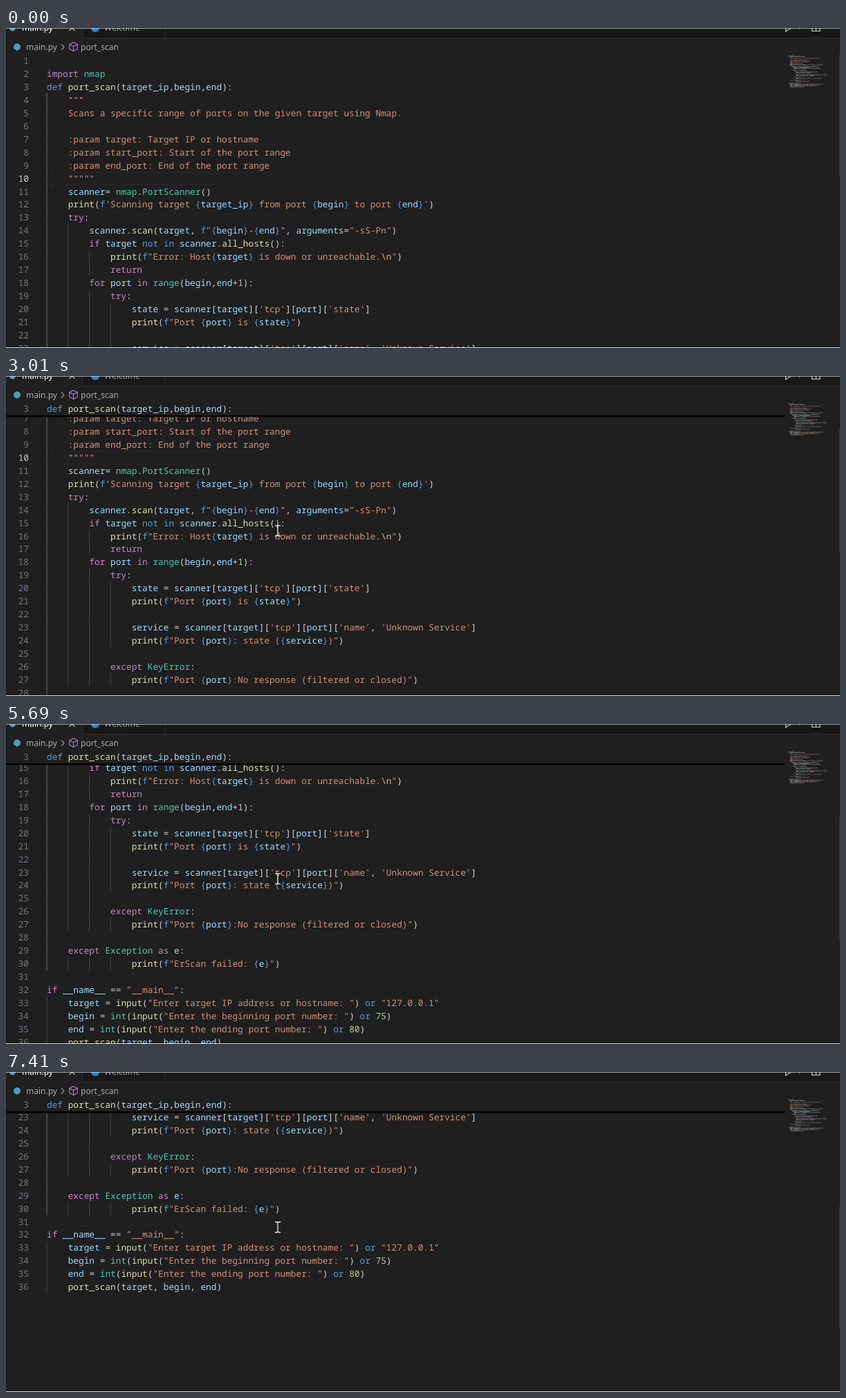
Animation of 1206x464 px, one loop 8000 ms. Source, as an HTML page:

```html
<!DOCTYPE html>
<html lang="en">
<head>
<meta charset="utf-8">
<title>Code editor scrolling</title>
<style>
  html, body { margin: 0; width: 100%; height: 100%; overflow: hidden; background: #1f1f1f; }
  svg { display: block; width: 100%; height: 100%; }
  .code text { font: 500 12.795px "Noto Sans Mono", "DejaVu Sans Mono", monospace; white-space: pre; text-rendering: geometricPrecision; }
  .ui { font: 12px "Noto Sans", "Open Sans", sans-serif; }
  #minimap { opacity: .6; filter: saturate(.5); }
</style>
</head>
<body>
<svg id="stage" viewBox="0 0 1206 464" xmlns="http://www.w3.org/2000/svg">
  <defs>
    <clipPath id="editorClip"><rect y="38" width="1206" height="426"/></clipPath>
    <linearGradient id="shade" x2="0" y2="1">
      <stop offset="0" stop-color="#000"/>
      <stop offset=".5" stop-color="#000" stop-opacity=".9"/>
      <stop offset="1" stop-color="#000" stop-opacity="0"/>
    </linearGradient>
  </defs>
  <rect width="1206" height="464" fill="#1f1f1f"/>
  <g class="code" clip-path="url(#editorClip)">
    <g id="rows"></g>
    <g id="sticky">
      <rect y="38" width="1126" height="19" fill="#1f1f1f"/>
      <rect y="57" width="1126" height="3.5" fill="url(#shade)"/>
    </g>
  </g>
  <g id="minimap"></g>
  <rect id="slider" x="1205" width="1" height="179" fill="#383838"/>

  <g class="ui">
    <rect x="110" width="1096" height="15" fill="#181818"/>
    <path d="M110.5 0V14.5H1206M230.5 0V14" fill="none" stroke="#2b2b2b"/>
    <circle cx="9.500" cy="0" r="4.500" fill="#519aba"/>
    <text x="23" y="4" fill="#fff">main.py</text>
    <path d="M91.500 -4L99.500 4M99.500 -4L91.500 4" stroke="#ccc" stroke-width="1.100"/>
    <circle cx="129" cy="0" r="6" fill="#2489ca"/>
    <text x="142" y="4" fill="#9d9d9d">Welcome</text>
    <g fill="none" stroke="#ccc" stroke-width="1.100">
      <path d="M1127.500 -5V5L1135.500 0Z"/>
      <path d="M1144.500 -2L1147.500 1L1150.500 -2" stroke="#999"/>
      <path d="M1165.500 -7H1177V4.500H1165.500ZM1171.300 -7V4.500"/>
    </g>
    <circle cx="16" cy="27.500" r="5" fill="#519aba"/>
    <g fill="#a9a9a9">
      <text x="29" y="31.800">main.py</text>
      <text x="108" y="31.800">port_scan</text>
    </g>
    <path d="M80 23.500L84 27.700L80 32" fill="none" stroke="#a9a9a9" stroke-width="1.100"/>
    <path d="M97.500 20.800L103.300 23.600V30.200L97.500 33.600L91.700 30.200V23.600ZM91.700 23.600L97.500 26.700L103.300 23.600M97.500 26.700V33.600"
      fill="none" stroke="#b180d7" stroke-width="1.100" stroke-linejoin="round"/>
  </g>
  <path d="M0 .4H1206" stroke="#d8d8d8" stroke-width=".8"/>
  <path d="M0 463.500H1206" stroke="#d8d8d8"/>
  <path id="cursor" d="M-4 -7.500H-1.200L0 -6.500L1.200 -7.500H4M-4 7.500H-1.200L0 6.500L1.200 7.500H4M0 -6.500V6.500"
    fill="none" stroke="#f0f0f0" stroke-width="1.300"/>
</svg>
<script>
const LOOP = 8000;
const LINE = 18.95, TOP = 38, LEFT = 59, CHAR = 7.677;
const NOTCH = 49.87;
const CURRENT = 10;
const COLORS = {
  control: '#c586c0', word: '#569cd6', type: '#4ec9b0', call: '#dcdcaa', name: '#9cdcfe',
  string: '#ce9178', escape: '#d7ba7d', number: '#b5cea8', plain: '#d4d4d4'
};
const WORDS = {
  control: ['import', 'try', 'if', 'return', 'for', 'except', 'as'],
  word: ['def', 'not', 'or'],
  type: ['nmap', 'PortScanner', 'range', 'int', 'KeyError', 'Exception']
};
const LINES = String.raw`
import nmap
def port_scan(target_ip,begin,end):
    """
    Scans a specific range of ports on the given target using Nmap.

    :param target: Target IP or hostname
    :param start_port: Start of the port range
    :param end_port: End of the port range
    """""
    scanner= nmap.PortScanner()
    print(f'Scanning target {target_ip} from port {begin} to port {end}')
    try:
        scanner.scan(target, f"{begin}-{end}", arguments="-sS-Pn")
        if target not in scanner.all_hosts():
            print(f"Error: Host{target} is down or unreachable.\n")
            return
        for port in range(begin,end+1):
            try:
                state = scanner[target]['tcp'][port]['state']
                print(f"Port {port} is {state}")

                service = scanner[target]['tcp'][port]['name', 'Unknown Service']
                print(f"Port {port}: state ({service})")

            except KeyError:
                print(f"Port {port}:No response (filtered or closed)")

    except Exception as e:
                print(f"ErScan failed: {e}")

if __name__ == "__main__":
    target = input("Enter target IP address or hostname: ") or "127.0.0.1"
    begin = int(input("Enter the beginning port number: ") or 75)
    end = int(input("Enter the ending port number: ") or 80)
    port_scan(target, begin, end)`.split('\n');

const $ = id => document.getElementById(id);

function add(parent, tag, attrs, text) {
  const node = document.createElementNS('http://www.w3.org/2000/svg', tag);
  for (const key in attrs) node.setAttribute(key, attrs[key]);
  if (text !== undefined) node.textContent = text;
  parent.appendChild(node);
  return node;
}

function wordKind(word, line, end) {
  if (/^\d/.test(word)) return 'number';
  if (word === 'in') return line.includes('not in') ? 'word' : 'control';
  for (const kind in WORDS) if (WORDS[kind].includes(word)) return kind;
  return line[end] === '(' ? 'call' : 'name';
}

// Splits one line into [text, kind] pairs.
function tokenize(line, number) {
  if (number >= 4 && number <= 10) return [[line, 'string']];
  const tokens = [];
  for (const m of line.matchAll(/\bf?(["']).*?\1|(["']).*?\2|\w+|\s+|[^\w\s"']+/g)) {
    const s = m[0];
    if (/^f["']/.test(s)) {
      tokens.push(['f', 'word']);
      for (const part of s.slice(1).split(/([{}]|\\n)/)) {
        const last = tokens[tokens.length - 1][0];
        const kind = /^[{}]$/.test(part) ? 'word' : part === '\\n' ? 'escape' : last === '{' ? 'name' : 'string';
        if (part) tokens.push([part, kind]);
      }
    } else if (/^["']/.test(s)) tokens.push([s, 'string']);
    else if (/^\w/.test(s)) tokens.push([s, wordKind(s, line, m.index + s.length)]);
    else tokens.push([s, 'plain']);
  }
  return tokens;
}

function drawLine(parent, number, y) {
  add(parent, 'text', {
    x: 33, y: y + 14, 'text-anchor': 'end', fill: number === CURRENT ? '#cccccc' : '#6e7681'
  }, number);
  const text = add(parent, 'text', { x: LEFT, y: y + 14 });
  for (const [s, kind] of tokenize(LINES[number - 1], number))
    add(text, 'tspan', { fill: COLORS[kind] }, s);
}

const indentOf = line => line.search(/\S/) / 4;

function drawGuides(number, y) {
  const below = LINES.slice(number - 1).find(line => line.trim());
  for (let level = 0; level < indentOf(below); level++) {
    const active = level === 0 && number < 31;
    add($('rows'), 'rect', {
      x: LEFT - 0.4 + level * 4 * CHAR, y, width: 1, height: LINE, fill: active ? '#707070' : '#404040'
    });
  }
}

function drawMinimapLine(line, number) {
  let column = 0;
  for (const [s, kind] of tokenize(line, number)) {
    for (const m of s.matchAll(/\S+/g))
      add($('minimap'), 'rect', {
        x: 1131 + (column + m.index) * 0.69, y: 38.2 + (number - 1) * 1.33,
        width: m[0].length * 0.69, height: 0.85, fill: COLORS[kind]
      });
    column += s.length;
  }
}

LINES.forEach((line, i) => {
  const number = i + 1, y = TOP + i * LINE;
  if (number === CURRENT)
    add($('rows'), 'path', {
      d: `M58.5 ${y + 0.9}H1125.5M58.5 ${y + LINE - 0.3}H1125.5`, stroke: '#2a2a2a'
    });
  drawGuides(number, y);
  drawLine($('rows'), number, y);
  drawMinimapLine(line, number);
});
drawLine($('sticky'), 3, TOP);

const NOTCH_TIMES = [2090, 2950, 3830, 5030, 5690, 5750, 6680, 7410];

function cursorAt(t) {
  if (t >= 6680) return [393, 225];
  if (t >= 2090) return [393, 224.4];
  if (t >= 1760) return [393, 221.5];
  // The pointer is sampled every 70 ms while it glides in.
  const p = Math.min(11, Math.floor((t - 460) / 70)) / 11;
  const rest = (1 - p) ** 2;
  return [394 + 282 * rest, 221.5 + 156 * rest];
}

function render(t) {
  const scroll = NOTCH * NOTCH_TIMES.filter(time => t >= time).length;
  $('rows').setAttribute('transform', `translate(0 ${-scroll})`);
  $('sticky').setAttribute('visibility', scroll ? 'visible' : 'hidden');
  $('slider').setAttribute('y', TOP + scroll * 0.39);
  $('cursor').setAttribute('visibility', t >= 460 ? 'visible' : 'hidden');
  $('cursor').setAttribute('transform', `translate(${cursorAt(t)})`);
}

const start = performance.now();
function tick() {
  render((performance.now() - start) % LOOP);
  requestAnimationFrame(tick);
}
tick();
</script>
</body>
</html>
```
